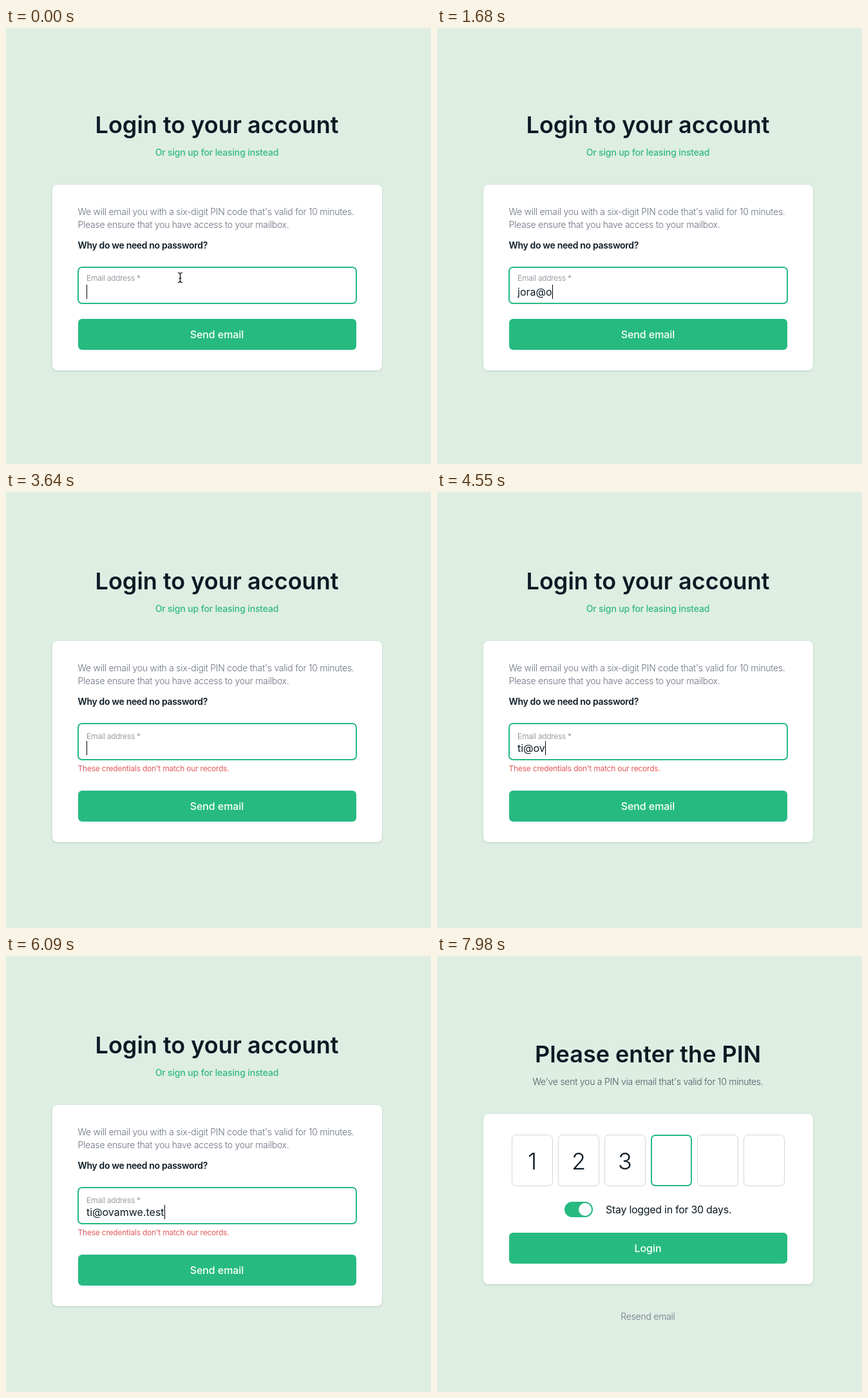
Recreate the animation shown at these times as an HTML page. Size 660x676 px, loop 8000 ms.

```html
<!DOCTYPE html>
<html lang="en">
<head>
<meta charset="utf-8">
<title>Login</title>
<style>
  :root { --green: #26ba81; --ink: #0b1a24; --grey: #6b7280; }
  html, body { margin: 0; width: 100%; height: 100%; overflow: hidden; background: #deeee3; }
  svg { display: block; width: 100%; height: 100%; }
  text { font: 400 14px Inter, "Open Sans", sans-serif; letter-spacing: -.018em; fill: var(--ink); }
  .center { text-anchor: middle; }
  .title { font-size: 36px; font-weight: 600; letter-spacing: 0; }
  .link { font-weight: 500; letter-spacing: -.01em; fill: #32b983; }
  .light { font-weight: 300; fill: var(--grey); }
  .intro { fill: #4b5a62; }
  .question { font-weight: 600; letter-spacing: -.024em; }
  .label { font-size: 12px; font-weight: 300; fill: #7c838c; }
  .value { font-size: 16px; letter-spacing: 0; }
  .error { font-size: 12px; fill: #e25a5a; }
  .action { font-size: 16px; font-weight: 500; letter-spacing: -.005em; fill: #fff; }
  .stay { font-size: 16px; }
  .digit { font-size: 36px; font-weight: 300; letter-spacing: 0; }
  .card { fill: #fff; filter: drop-shadow(0 1px 1.5px rgba(0, 40, 20, .16)); }
  .fill { fill: var(--green); }
  .field { fill: #fff; stroke: var(--green); stroke-width: 2; }
  .pin { fill: #fff; stroke: #d1d5db; stroke-width: 1; }
  .pin.active { stroke: var(--green); stroke-width: 2; }
</style>
</head>
<body>
<svg viewBox="0 0 660 676" xmlns="http://www.w3.org/2000/svg">
  <g id="loginPage">
    <rect id="card" class="card" x="72" y="243" width="512" height="288" rx="8"/>
    <g id="form">
      <text class="title center" x="327.5" y="163">Login to your account</text>
      <text class="link center" x="327.5" y="198">Or sign up for leasing instead</text>
      <text class="light" x="111.5" y="290">We will email you with a six-digit PIN code that's valid for 10 minutes.</text>
      <text class="light" x="111.5" y="310">Please ensure that you have access to your mailbox.</text>
      <text class="question" x="111.5" y="342">Why do we need no password?</text>
      <rect class="field" x="112" y="371" width="432" height="56" rx="6"/>
      <text id="label" class="label" x="125" y="392">Email address *</text>
      <text id="value" class="value" x="125" y="415"></text>
      <rect id="caret" x="125" y="398" width="1" height="22"/>
    </g>
    <text id="error" class="error" x="111.5" y="433">These credentials don't match our records.</text>
    <g id="send">
      <rect class="fill" x="112" y="451" width="432" height="48" rx="6"/>
      <text class="action center" x="327.5" y="481">Send email</text>
    </g>
    <g id="pointer" fill="none" stroke-linecap="square">
      <path id="beam" stroke="#fff" stroke-width="3" d="M267.5 379.5q3 0 3 2.5v10q0 2.5-3 2.5M273.5 379.5q-3 0-3 2.5v10q0 2.5 3 2.5M269 388h3"/>
      <use href="#beam"/>
      <path stroke="#000" stroke-width="1.2" d="M267.5 379.5q3 0 3 2.5v10q0 2.5-3 2.5M273.5 379.5q-3 0-3 2.5v10q0 2.5 3 2.5M269 388h3"/>
    </g>
  </g>

  <g id="pinPage">
    <text class="title center" x="327.5" y="165">Please enter the PIN</text>
    <text class="light intro center" x="327.5" y="200">We've sent you a PIN via email that's valid for 10 minutes.</text>
    <rect class="card" x="72" y="245" width="512" height="264" rx="8"/>
    <g id="pins"></g>
    <rect class="fill" x="198" y="381" width="44" height="24" rx="12"/>
    <circle cx="230" cy="393" r="10" fill="#fff"/>
    <text class="stay" x="262" y="399">Stay logged in for 30 days.</text>
    <rect class="fill" x="112" y="429" width="432" height="48" rx="6"/>
    <text class="action center" x="327.5" y="459">Login</text>
    <text class="light center" x="327.5" y="564">Resend email</text>
  </g>
</svg>
<script>
  const LOOP = 8000, REJECTED = 3340, ACCEPTED = 6160;
  const FIRST = "jora@ovamwe.test", SECOND = "ti@ovamwe.test";
  const DIGIT_TIMES = [7350, 7590, 7840];
  const $ = id => document.getElementById(id);

  function add(parent, name, attributes) {
    const node = document.createElementNS("http://www.w3.org/2000/svg", name);
    for (const key in attributes) node.setAttribute(key, attributes[key]);
    return parent.appendChild(node);
  }

  const pins = Array.from({ length: 6 }, (_, i) => {
    const x = 116 + 72 * i;
    return {
      box: add($("pins"), "rect", { rx: 6 }),
      digit: add($("pins"), "text", { class: "digit center", x: x + 32, y: 331 }),
      x
    };
  });

  const show = (id, visible) => { $(id).style.display = visible ? "" : "none"; };
  const shift = (id, y) => $(id).setAttribute("transform", `translate(0 ${y})`);
  const typed = (text, t, start, step) =>
    text.slice(0, Math.max(0, Math.floor((t - start) / step) + 1));

  function drawLogin(t) {
    const rejected = t >= REJECTED;
    const offset = rejected ? 12 : 0;
    shift("form", -offset);
    shift("send", offset);
    shift("label", rejected ? 3 : 0);
    $("card").setAttribute("y", 243 - offset);
    $("card").setAttribute("height", 288 + 2 * offset);
    show("error", rejected);
    show("pointer", t < 840);

    const value = $("value");
    value.textContent = rejected
      ? typed(SECOND, t, 4000, 120)
      : typed(FIRST, t, 840, t < 1680 ? 160 : 145);
    const width = value.textContent ? value.getComputedTextLength() : 0;
    $("caret").setAttribute("x", 125 + Math.round(width));
  }

  function drawPin(t) {
    const count = DIGIT_TIMES.filter(time => t >= time).length;
    pins.forEach(({ box, digit, x }, i) => {
      const active = i === count, inset = active ? 1 : .5;
      box.setAttribute("class", active ? "pin active" : "pin");
      box.setAttribute("x", x + inset);
      box.setAttribute("y", 277 + inset);
      box.setAttribute("width", 64 - 2 * inset);
      box.setAttribute("height", 80 - 2 * inset);
      digit.textContent = i < count ? i + 1 : "";
    });
  }

  function draw(t) {
    const accepted = t >= ACCEPTED;
    show("loginPage", !accepted);
    show("pinPage", accepted);
    (accepted ? drawPin : drawLogin)(t);
  }

  const start = performance.now();
  function tick() {
    draw((performance.now() - start) % LOOP);
    requestAnimationFrame(tick);
  }
  tick();
</script>
</body>
</html>
```
